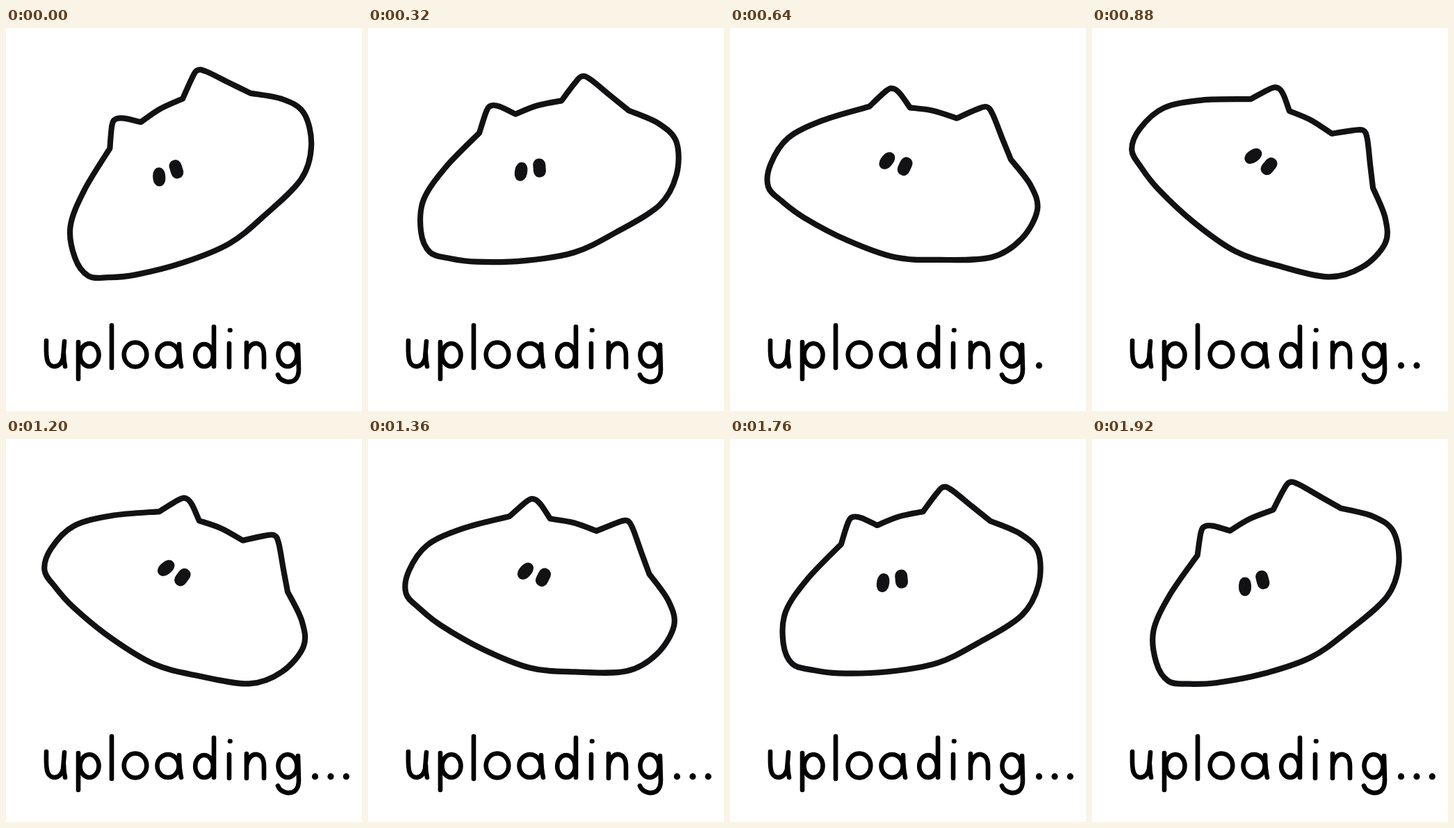
These frames come from a looping animation (512x550 px, 2 s). An HTML page:

```html
<!DOCTYPE html>
<html lang="en">
<head>
<meta charset="utf-8">
<title>uploading</title>
<style>
  html, body { margin: 0; width: 100%; height: 100%; overflow: hidden; background: #fff; }
  svg { display: block; width: 100vw; height: 100vh; }
</style>
</head>
<body>
<svg viewBox="0 0 512 550" role="img" aria-label="uploading...">
  <g id="cat" fill="#121113">
    <path id="outline" fill="none" stroke="#121113" stroke-width="8.2" stroke-linejoin="round"/>
    <rect x="-9" y="-13.5" width="18" height="27" rx="8.5" ry="11.5" transform="translate(222 198) rotate(24)"/>
    <rect x="-9" y="-13.5" width="18" height="27" rx="8" ry="9.5" transform="translate(249 199.5) rotate(10)"/>
  </g>
  <g fill="none" stroke="#000" stroke-width="6.6" stroke-linecap="round" stroke-linejoin="round">
    <path d="M58 449C58 460 57 472 60 479C64 489 78 489 82 474L84 450M83 468Q83 478 85 486"/>
    <path d="M104 451V504"/>
    <ellipse cx="120" cy="469.5" rx="13.5" ry="16.5"/>
    <path d="M152 427V488"/>
    <ellipse cx="186" cy="469" rx="16.3" ry="17.5"/>
    <ellipse cx="233" cy="469.5" rx="15.5" ry="16.5"/>
    <path d="M249 454Q249 474 252 486"/>
    <ellipse cx="285" cy="470" rx="12.8" ry="16"/>
    <path d="M299 429V486"/>
    <path d="M321 453V487M322 434h.5"/>
    <path d="M346 452V487M346 469C348 457 355 452 361 453C370 455 371 463 371 470V487"/>
    <ellipse cx="405" cy="469.5" rx="13.5" ry="16.5"/>
    <path d="M420 455L421 490C421 505 413 509 404 508Q394 506 391 498"/>
  </g>
  <g id="dots" fill="#000">
    <circle cx="444.5" cy="484.7" r="4.6"/>
    <circle cx="467" cy="484.7" r="4.6"/>
    <circle cx="489.3" cy="484.7" r="4.6"/>
  </g>
</svg>
<script>
  const LOOP = 2000, STEP = 80;
  const SWING_PERIOD = 2080, SWING = 59, LOWEST = -27.5, SKEW = 0.157;
  const PIVOT = '253.5 209.5';
  const FIRST_DOT = 480, DOT_DELAY = 280;

  // Key points joined by smooth curves; each run ends in a sharp corner.
  const LEFT_EAR = [[178, 129], [196, 101], [205, 95.5], [216, 100], [235, 116]];
  const FOREHEAD = [[235, 116], [268, 112], [304, 114]];
  const RIGHT_EAR = [[304, 114], [328, 95], [341, 87.5], [352, 95], [374, 125], [394, 152]];
  const BODY = [[394, 152], [431, 181], [449, 213], [437, 259], [402, 295], [331, 317],
                [267, 329.5], [195, 323], [127, 307], [90, 292], [66, 277], [61, 245],
                [76, 202], [118, 165], [178, 129]];
  const RUNS = [LEFT_EAR, FOREHEAD, RIGHT_EAR, BODY];

  const cat = document.getElementById('cat');
  const dots = [...document.getElementById('dots').children];

  function curve(points) {
    const at = i => points[Math.max(0, Math.min(points.length - 1, i))];
    const handle = (i, sign) => at(i).map((v, k) => v + sign * (at(i + 1)[k] - at(i - 1)[k]) / 6);
    return points.slice(1).map((p, i) => `C${handle(i, 1)} ${handle(i + 1, -1)} ${p}`).join('');
  }

  const wave = phase => (1 - Math.cos(phase)) / 2;

  // The phase runs slightly ahead near the far end of the swing.
  function angleAt(t) {
    const phase = 2 * Math.PI * t / SWING_PERIOD;
    return LOWEST + SWING * wave(phase + SKEW * wave(phase) ** 2);
  }

  function draw(now) {
    const t = Math.floor(now % LOOP / STEP) * STEP;
    cat.setAttribute('transform', `rotate(${angleAt(t).toFixed(2)} ${PIVOT})`);
    dots.forEach((dot, i) => {
      dot.setAttribute('visibility', t >= FIRST_DOT + DOT_DELAY * i ? 'visible' : 'hidden');
    });
  }

  document.getElementById('outline').setAttribute('d', `M${RUNS[0][0]}${RUNS.map(curve).join('')}Z`);

  const start = performance.now();
  function tick() {
    draw(performance.now() - start);
    requestAnimationFrame(tick);
  }
  tick();
</script>
</body>
</html>
```
